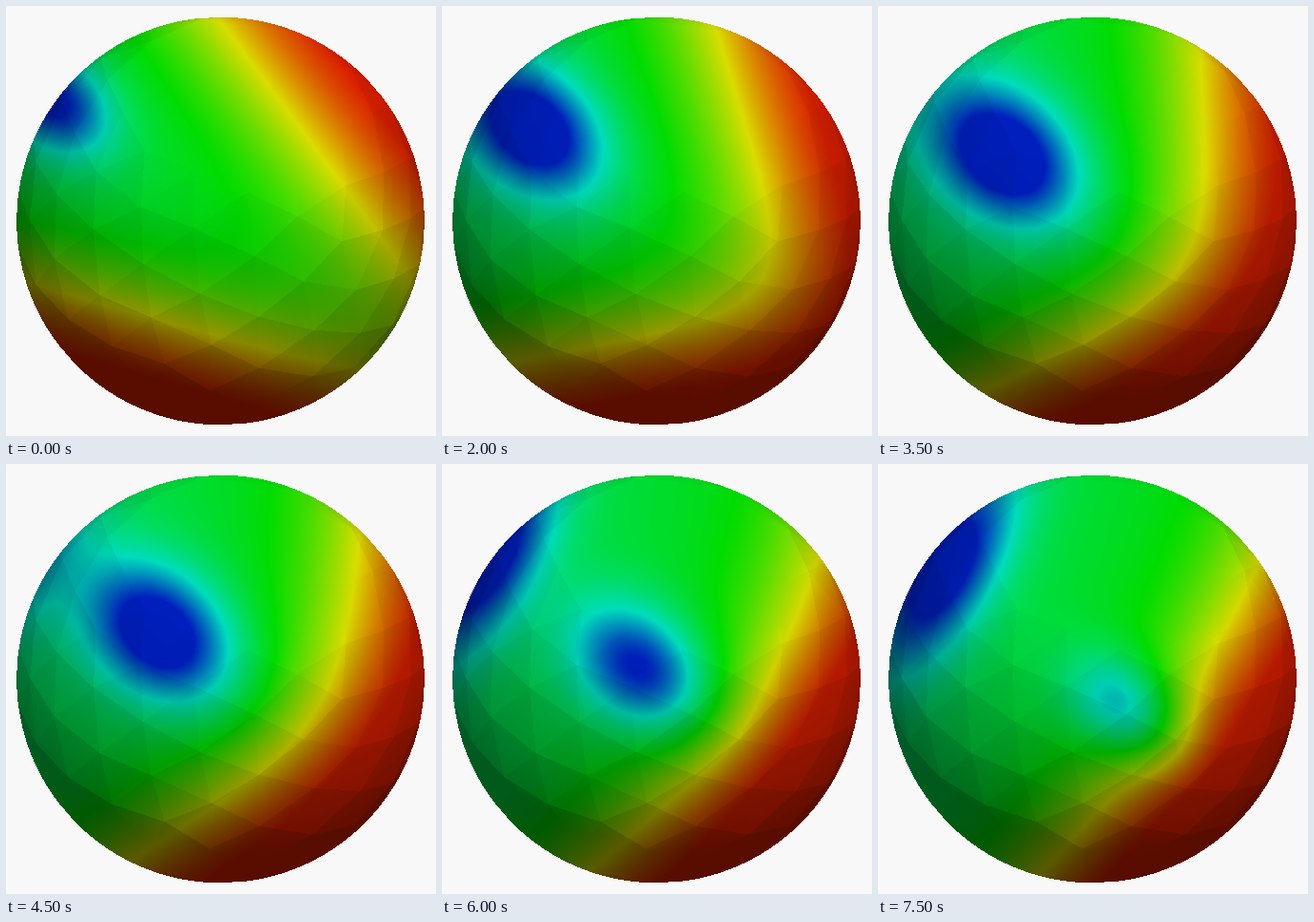
Animation of 452 by 452 pixels, one loop 8 s. Source, as an HTML page with a canvas:

```html
<!DOCTYPE html>
<html>
<head>
<meta charset="utf-8">
<style>
html, body { margin: 0; width: 100%; height: 100%; overflow: hidden; background: #f8f8f8; }
canvas { display: block; width: 452px; height: 452px; }
</style>
</head>
<body>
<canvas id="stage" width="452" height="452"></canvas>
<script>
const SIZE = 452, CX = 225.5, CY = 226, RADIUS = 217, RIM = 214.3;
const LOOP = 8000, STEP = 500;

// Orientation of the sphere: images of the x, y and z axes.
const AXES = [[-.547, -.683, .483], [.817, -.562, .13], [.187, .463, .866]];

const clamp = (v, lo, hi) => Math.min(hi, Math.max(lo, v));
const ease = (lo, hi, v) => {
  const k = clamp((v - lo) / (hi - lo), 0, 1);
  return k * k * (3 - 2 * k);
};
const dot = (a, b) => a[0] * b[0] + a[1] * b[1] + a[2] * b[2];
const sub = (a, b) => a.map((v, i) => v - b[i]);
const add = (a, b) => a.map((v, i) => v + b[i]);
const unit = a => a.map(v => v / Math.hypot(...a));
const cross = (a, b) => [
  a[1] * b[2] - a[2] * b[1], a[2] * b[0] - a[0] * b[2], a[0] * b[1] - a[1] * b[0]
];

function icosahedron() {
  const phi = (1 + Math.sqrt(5)) / 2, pts = [], faces = [];
  for (const s of [-1, 1]) for (const q of [-phi, phi]) pts.push([0, s, q], [s, q, 0], [q, 0, s]);
  const near = (a, b) => Math.hypot(...sub(pts[a], pts[b])) < 2.1;
  const place = p => unit([0, 1, 2].map(i => AXES.reduce((sum, axis, k) => sum + axis[i] * p[k], 0)));
  for (let a = 0; a < 12; a++)
    for (let b = a + 1; b < 12; b++)
      for (let c = b + 1; c < 12; c++)
        if (near(a, b) && near(b, c) && near(a, c)) faces.push([a, b, c].map(i => place(pts[i])));
  return faces;
}

function split([a, b, c]) {
  const ab = unit(add(a, b)), bc = unit(add(b, c)), ca = unit(add(c, a));
  return [[a, ab, ca], [ab, b, bc], [ca, bc, c], [ab, bc, ca]];
}

const light = n => .436 + .08 * n[0] - .36 * n[1] + .4 * n[2];

// Brightness of every pixel; zero means background.
const shade = new Float32Array(SIZE * SIZE);

function shadeFacet(pts) {
  let flat = unit(cross(sub(pts[1], pts[0]), sub(pts[2], pts[0])));
  if (dot(flat, pts[0]) < 0) flat = flat.map(v => -v);
  if (flat[2] <= 0) return;
  const at = pts.map(p => [CX + RADIUS * p[0], CY + RADIUS * p[1]]);
  const lit = pts.map(p => .4 * light(p) + .6 * light(flat));
  const [a, b, c] = at;
  const area = (b[0] - a[0]) * (c[1] - a[1]) - (b[1] - a[1]) * (c[0] - a[0]);
  const range = i => {
    const v = at.map(p => p[i]);
    return [Math.floor(Math.min(...v)), Math.ceil(Math.max(...v))];
  };
  const [x0, x1] = range(0), [y0, y1] = range(1);
  for (let y = y0; y <= y1; y++) {
    for (let x = x0; x <= x1; x++) {
      const px = x + .5 - a[0], py = y + .5 - a[1];
      const wb = (px * (c[1] - a[1]) - py * (c[0] - a[0])) / area;
      const wc = (py * (b[0] - a[0]) - px * (b[1] - a[1])) / area;
      const wa = 1 - wb - wc;
      if (Math.min(wa, wb, wc) < -1e-6) continue;
      if (Math.hypot(x + .5 - CX, y + .5 - CY) > RIM) continue;
      shade[y * SIZE + x] = clamp(wa * lit[0] + wb * lit[1] + wc * lit[2], .36, .88);
    }
  }
}

icosahedron().flatMap(split).flatMap(split).forEach(shadeFacet);

// Soft half-plane: one half on the line through (x0, y0), rising along the angle.
function front(x0, y0, degrees, width) {
  const nx = Math.cos(degrees * Math.PI / 180), ny = Math.sin(degrees * Math.PI / 180);
  return (x, y) => 1 / (1 + Math.exp(-((x - x0) * nx + (y - y0) * ny) / width));
}

// Soft ellipse whose long axis points along the angle.
function spot(x0, y0, degrees, along, across, depth) {
  const c = Math.cos(degrees * Math.PI / 180), s = Math.sin(degrees * Math.PI / 180);
  return (x, y) => {
    const u = ((x - x0) * c + (y - y0) * s) / along;
    const v = ((y - y0) * c - (x - x0) * s) / across;
    return depth * Math.exp(-(u * u + v * v) / 2);
  };
}

// Temperature from 0 (blue) to 1 (red) at t seconds.
function fieldAt(t) {
  const swell = Math.sin(Math.PI * t / 7.5);
  // Two warm fronts turn towards each other.
  const right = front(328 + 60 * ease(2, 6, t), 150, -38 + 8.4 * t + 5 * swell, 45);
  const below = front(210, 342 + 1.2 * t * t, 107 - 15 * t + t * t, 36);
  // One cold spot crosses the middle, a second one enters at the upper left.
  const across = 34 + 12 * swell;
  const drift = spot(50 + 20 * t + 1.1 * t * t, 100 + 12 * t + 1.2 * t * t, 40,
    1.4 * across, across, .4 + .12 * Math.sin(Math.PI * t / 6.5));
  const enter = (t - 4) / 3.5;
  const corner = spot(15 + 55 * enter, 85 + 25 * enter, -60, 85, 36, .45 * ease(3, 6, t));
  return (x, y) => {
    const base = .38 + .00022 * x;
    const warm = 1 - (1 - right(x, y)) * (1 - below(x, y));
    return base + warm * (1.06 - base) - drift(x, y) - corner(x, y);
  };
}

const ctx = document.getElementById('stage').getContext('2d');
const image = ctx.createImageData(SIZE, SIZE);

function draw(ms) {
  const field = fieldAt(ms / 1000);
  image.data.fill(248);
  for (let i = 0; i < shade.length; i++) {
    const o = 4 * i;
    image.data[o + 3] = 255;
    if (!shade[i]) continue;
    const s = 4 * clamp(field(i % SIZE, Math.floor(i / SIZE)), .035, .965);
    const lum = 255 * shade[i];
    image.data[o] = .97 * lum * clamp(s - 2, 0, 1);
    image.data[o + 1] = .98 * lum * clamp(Math.min(s, 4 - s), 0, 1);
    image.data[o + 2] = .84 * lum * clamp(2 - s, 0, 1);
  }
  ctx.putImageData(image, 0, 0);
}

const start = performance.now();
let shown = -1;
function tick() {
  const step = Math.floor(((performance.now() - start) % LOOP) / STEP);
  if (step !== shown) draw((shown = step) * STEP);
  requestAnimationFrame(tick);
}
tick();
</script>
</body>
</html>
```
